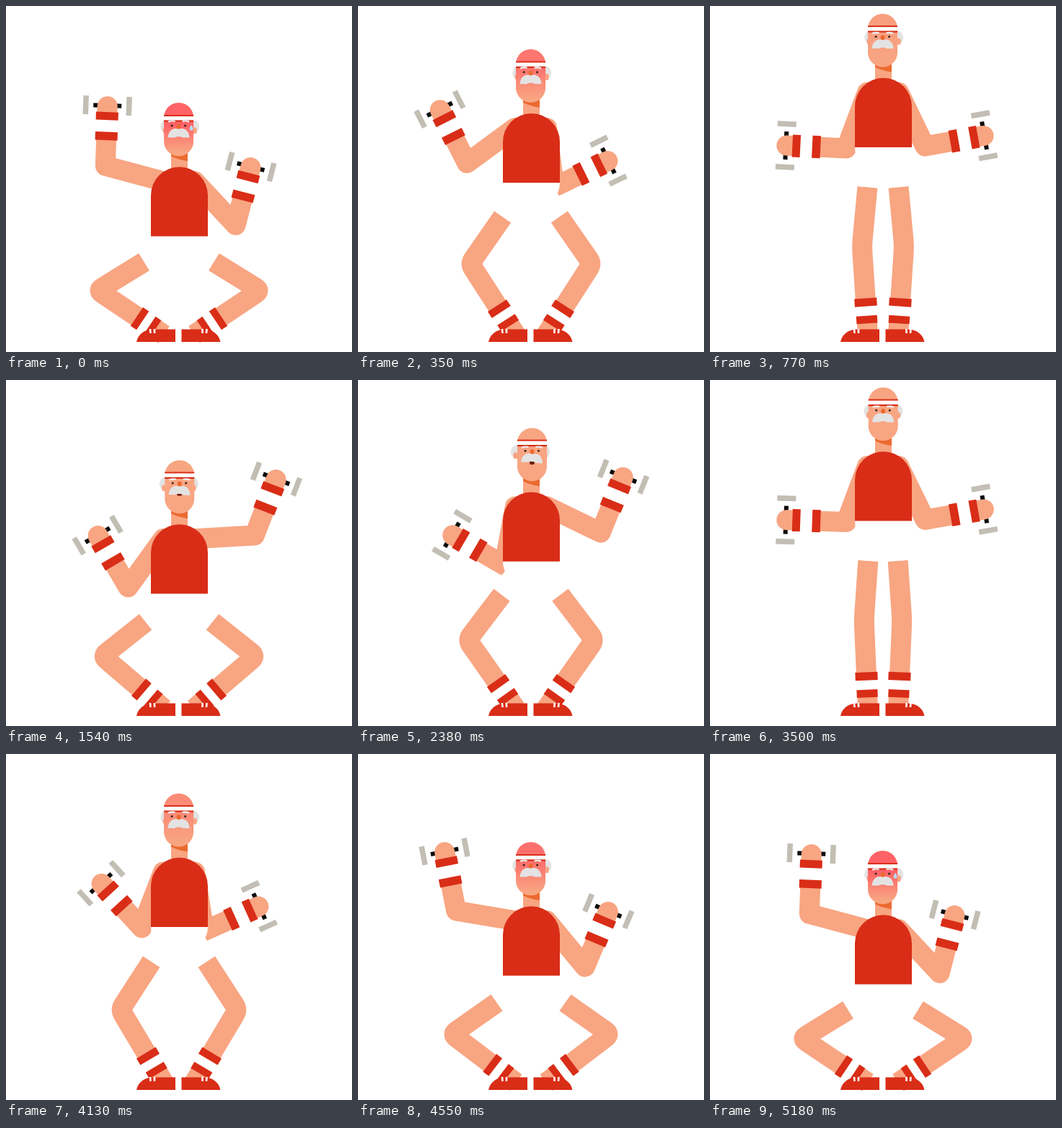
An HTML page that plays this animation: 480x480 px, repeating every 5.25 s.

```html
<!DOCTYPE html>
<html lang="en">
<head>
<meta charset="utf-8">
<title>Squats with dumbbells</title>
<style>
  html, body { margin: 0; width: 100%; height: 100%; overflow: hidden; background: #fff; }
  svg { display: block; width: 100vw; height: 100vh; }
  .skin { fill: #f8a582; }
  .red { fill: #d92d17; }
  .white { fill: #fff; }
  .hair { fill: #e3e3e3; }
  .limb { fill: none; stroke: #f8a582; stroke-width: 28; stroke-linejoin: round; }
  .hem { stroke: #fff; stroke-width: 33; }
  .brow { fill: none; stroke: #ececec; stroke-width: 2.4; }
</style>
</head>
<body>
<svg viewBox="0 0 480 480">
  <defs>
    <linearGradient id="flush" gradientUnits="userSpaceOnUse" x1="0" y1="0" x2="0" y2="74">
      <stop offset=".4" stop-color="#ff6267"/>
      <stop offset=".92" stop-color="#ff6267" stop-opacity="0"/>
    </linearGradient>

    <g id="dumbbell" transform="translate(0 -1)">
      <path d="M-19.5 0H19.5" stroke="#0a0a0a" stroke-width="6"/>
      <path d="M-30 -13V13M30 -13V13" stroke="#c2beb4" stroke-width="7.5"/>
    </g>

    <g id="wrist">
      <rect class="white" x="-15.5" y="18" width="31" height="19"/>
      <rect class="red" x="-15.5" y="8" width="31" height="11"/>
      <rect class="red" x="-15.5" y="35.500" width="31" height="11.5"/>
    </g>

    <g id="sock">
      <rect class="white" x="-15.5" y="-40" width="31" height="16"/>
      <rect class="red" x="-15.5" y="-50" width="31" height="11"/>
      <rect class="red" x="-14.5" y="-26" width="29" height="10.5"/>
    </g>

    <g id="shoe">
      <path class="red" d="M181 466C183 456 191 449 204 448.5H235V466Z"/>
      <path d="M200 448L200.500 454M206 448V454" stroke="#fff" stroke-width="2.6"/>
    </g>
  </defs>

  <g id="arms"></g>
  <g id="legs"></g>
  <use href="#shoe"/>
  <use href="#shoe" transform="translate(478.500) scale(-1 1)"/>

  <g id="body">
    <path class="white" d="M201 180H280V186A30 30 0 0 1 250 216H231A30 30 0 0 1 201 186Z"/>
    <rect class="skin" x="229" y="60" width="23" height="40"/>
    <path d="M229 66H252V81Q239 79 229 74Z" fill="#ec6a30"/>
    <path class="red" d="M201 185.300V128.500A39.500 39.500 0 0 1 280 128.500V185.300Z"/>
  </g>

  <g id="head">
    <g id="sides">
      <ellipse class="hair" cx="-18" cy="33" rx="9" ry="9.500"/>
      <ellipse class="hair" cx="18" cy="33" rx="9" ry="9.500"/>
      <ellipse class="skin" cx="-20.500" cy="38.500" rx="3.200" ry="4.500"/>
      <ellipse class="skin" cx="20.500" cy="38.500" rx="3.200" ry="4.500"/>
    </g>
    <rect class="skin" x="-20.500" width="41" height="74" rx="20.500"/>
    <rect id="blush" x="-20.500" width="41" height="74" rx="20.500" fill="url(#flush)"/>
    <g id="band">
      <rect class="red" x="-20.500" width="41" height="9.500"/>
      <rect class="white" x="-21.500" y="2" width="43" height="5.300"/>
    </g>
    <path id="brows" class="brow" d="M-14.500 1.200Q-10 -.8 -5 .4M14.500 1.200Q10 -.8 5 .4"/>
    <g fill="#33241f">
      <circle cx="-9.500" cy="31.800" r="1.500"/>
      <circle cx="9" cy="31.800" r="1.500"/>
    </g>
    <ellipse cy="33" rx="3" ry="3.400" fill="#ea6a30"/>
    <ellipse id="mouth" cy="48" rx="3.500" fill="#6a1c10"/>
    <path id="tache" class="hair" d="M-15 48.300C-14.500 39 -8 33.500 0 36.500C8 33.500 14.500 39 15 48.300H6Q0 45 -6 48.300Z"/>
    <path id="sweat" d="M17.500 30.500C18.500 33 20 34.300 20 36A2.500 2.500 0 0 1 15 36C15 34.300 16.500 33 17.500 30.500Z" fill="#b3dff6"/>
  </g>
</svg>

<script>
const LOOP = 5250, STEP = 70;
const UPPER = 83, FORE = 82.7;
const ANKLE = [219, 456], HIP_X = 222, SHOULDER_X = 218;
const STAND = 10.3, DROP = 124;
const $ = id => document.getElementById(id);

// Eased step from 0 to 1; softness above 1 gives a quick start and a long settle.
function ramp(t, from, to, softness = 1) {
  const u = Math.min(1, Math.max(0, (t - from) / (to - from)));
  const v = 1 - (1 - u) ** softness;
  return v * v * (3 - 2 * v);
}

const pulse = (t, up, top, down, end, softness) =>
  ramp(t, up, top, softness) - ramp(t, down, end);

// 1 in the deepest squat, 0 standing.
const depth = t => 1 - pulse(t, 0, 900, 1120, 1700, 1.7) - pulse(t, 1966, 3116, 3710, 4750, 1.7);

// Key poses by depth: [depth, upper arm, forearm], degrees away from straight down.
const PRESS = [[0, 20.5, 92], [.36, 21, 138], [.6, 64, 158], [.83, 95.5, 159], [1, 105, 182]];
const CURL = [[0, 26, 100], [.4, 7, 116], [.83, 37, 151], [1, 43, 165.5]];

const mix = (a, b, u) => a.map((p, i) => p + (b[i] - p) * u);

function poseAt(poses, d) {
  const i = Math.max(1, poses.findIndex(p => p[0] >= d));
  const a = poses[i - 1], b = poses[i];
  return mix(a, b, (d - a[0]) / (b[0] - a[0])).slice(1);
}

const mirror = ['', 'translate(480) scale(-1 1)'];
$('arms').innerHTML = mirror.map(m => `<g transform="${m}">
  <g class="grip"><use href="#dumbbell"/></g><path class="limb" stroke-linecap="round"/>
  <g class="grip"><use href="#wrist"/></g></g>`).join('');
$('legs').innerHTML = mirror.map(m => `<g transform="${m}">
  <path class="limb"/><path class="hem"/><use href="#sock"/></g>`).join('');

const set = (el, name, value) => el.setAttribute(name, value);
const reach = ([x, y], deg, len) => {
  const a = deg * Math.PI / 180;
  return [x - len * Math.sin(a), y + len * Math.cos(a)];
};

function poseArm(g, top, [upper, fore]) {
  const shoulder = [SHOULDER_X, top + 109];
  const elbow = reach(shoulder, upper, UPPER);
  const hand = reach(elbow, fore, FORE);
  set(g.querySelector('.limb'), 'd', `M${shoulder}L${elbow}L${hand}`);
  for (const grip of g.querySelectorAll('.grip'))
    set(grip, 'transform', `translate(${hand}) rotate(${fore + 180})`);
}

function poseLeg(g, top) {
  const hip = [HIP_X, top + 202];
  const half = (ANKLE[1] - hip[1]) / 2;
  const bend = 107 * Math.sqrt(Math.max(0, 1 - (half / 122.1) ** 2));
  const knee = [220.5 - bend, hip[1] + half - 1.5];
  const hem = mix(hip, knee, .32);
  const dx = knee[0] - ANKLE[0], dy = knee[1] - ANKLE[1];
  const turn = Math.atan2(dx, -dy) * 180 / Math.PI;
  set(g.querySelector('.limb'), 'd',
    `M${hem}L${mix(knee, hip, .07)}Q${knee} ${mix(knee, ANKLE, .07)}L${ANKLE}`);
  set(g.querySelector('.hem'), 'd', `M${hip}L${hem}`);
  set(g.querySelector('use'), 'transform',
    `translate(${ANKLE}) rotate(${turn}) scale(1 ${Math.hypot(dx, dy) / 122})`);
}

function poseHead(t, top) {
  const flush = 1 - pulse(t, 0, 950, 3500, 5000);
  const lean = 1.9 * pulse(t, 900, 2000, 2400, 4200) - .4;
  set($('head'), 'transform', `translate(${240 + lean} ${top})`);
  set($('sides'), 'transform', `translate(${.8 - 2.2 * lean})`);
  set($('blush'), 'opacity', flush);
  set($('band'), 'transform', `translate(0 ${16.3 + .5 * flush})`);
  set($('brows'), 'transform', `translate(0 ${26.3 - 1.2 * flush})`);
  set($('mouth'), 'ry', 3 * pulse(t, 1100, 2000, 2400, 2900));
  set($('tache'), 'transform', `rotate(${2.5 * Math.max(0, lean)} 0 42)`);
  set($('sweat'), 'opacity', 1 - pulse(t, 0, 350, 4500, 5000));
}

function draw(t) {
  const d = depth(t), top = STAND + DROP * d;
  const rising = depth(t + 1) < d;
  // The pressing arm trails the body on the way up.
  const press = poseAt(PRESS, d + (rising ? .15 * Math.sin(Math.PI * d) : 0));
  const curl = poseAt(CURL, d);
  // The arms trade roles while standing.
  const swap = pulse(t, 800, 1150, 2950, 3450);
  const [left, right] = $('arms').children;
  poseArm(left, top, mix(press, curl, swap));
  poseArm(right, top, mix(curl, press, swap));
  for (const leg of $('legs').children) poseLeg(leg, top);
  set($('body'), 'transform', `translate(0 ${top})`);
  poseHead(t, top);
}

const start = performance.now();
function tick() {
  const t = (performance.now() - start) % LOOP;
  draw(Math.floor(t / STEP) * STEP);
  requestAnimationFrame(tick);
}
tick();
</script>
</body>
</html>
```
